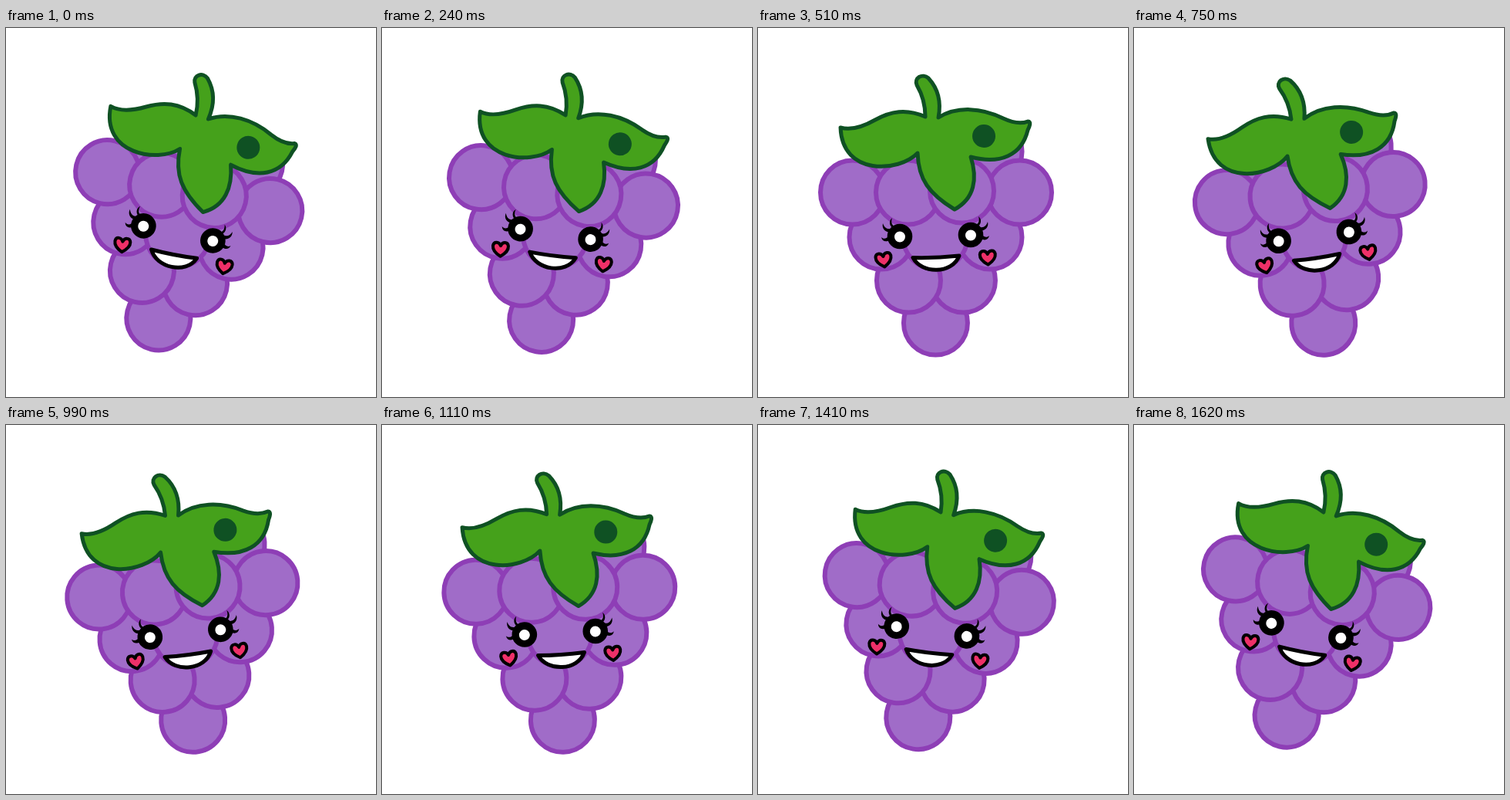
Write an HTML page that moves like this. It is 480 px wide and 478 px high and loops after 1650 ms.

```html
<!DOCTYPE html>
<html lang="en">
<head>
<meta charset="utf-8">
<title>Swinging grapes</title>
<style>
  html, body { margin: 0; width: 100%; height: 100%; overflow: hidden; background: #fff; }
  svg { display: block; width: 100%; height: 100%; }
  #grapes { fill: #a06cc8; stroke: #8e3eb6; stroke-width: 6; }
  #leaf { fill: #45a11b; stroke: #0f5123; stroke-width: 5; stroke-linejoin: round; }
  #mouth { fill: #fff; stroke: #000; stroke-width: 5; stroke-linejoin: round; }
  #heart { fill: #ee3068; stroke: #000; stroke-width: 4; stroke-linejoin: round; }
</style>
</head>
<body>
<svg viewBox="0 0 480 478">
  <defs>
    <path id="heart" d="M0 9.5C-6 6-10.5 2-10-4C-9-10-2-9.5 0-4C2-9.5 9-10 10-4C10.5 2 6 6 0 9.5Z"/>
  </defs>
  <g id="bunch">
    <g id="grapes"></g>
    <g id="leaf">
      <path d="M217 115C217 98 213 86 206 74C202 65 213 58 221 65C234 79 238 95 234 116C258 101 290 103 318 117C333 124 342 124 350 121C355 121 352 128 350 132C342 165 314 177 276 167C285 195 281 221 255 235C222 215 208 196 207 162C183 187 109 192 107 129C120 133 136 128 152 119C172 108 192 104 217 115Z"/>
      <circle cx="293" cy="140" r="15" fill="#0f5123" stroke="none"/>
    </g>
    <g id="eye">
      <circle cx="184" cy="270" r="16.3"/>
      <circle cx="184" cy="270.5" r="7" fill="#fff"/>
      <path d="M174 246C169 250 170 258 178 261L180 258C174 257 172 252 174 246ZM162 253C160 261 167 266 173 264L175 259C168 262 164 259 162 253ZM160 271C161 277 167 278 172 274L170 269C167 273 163 274 160 271Z"/>
    </g>
    <use href="#eye" transform="matrix(-1 0 0 1 460 -2)"/>
    <path id="mouth" d="M201 297.5C220 298 242 297 261 295C252 319 212 319 201 297.5Z"/>
    <use href="#heart" transform="translate(163 300) rotate(-8)"/>
    <use href="#heart" transform="translate(298 297) rotate(-3)"/>
  </g>
</svg>
<script>
const LOOP = 1650, STEP = 30;
const bunch = document.getElementById('bunch');

// Grape centres, back to front
const centres = [
  [178, 160], [301, 160],
  [230.5, 382], [266.5, 327], [195.5, 327],
  [160, 271], [301, 271], [230, 271],
  [122.5, 213], [339.5, 213], [194.5, 213], [264.5, 211]
];
document.getElementById('grapes').innerHTML =
  centres.map(([x, y]) => `<circle cx="${x}" cy="${y}" r="41.5"/>`).join('');

function draw(now) {
  const time = Math.floor(now % LOOP / STEP) * STEP;
  const angle = 3.35 + 9.95 * Math.cos((time - 8) / LOOP * 2 * Math.PI);
  bunch.setAttribute('transform', `rotate(${angle} 240 239)`);
  requestAnimationFrame(draw);
}
draw(0);
</script>
</body>
</html>
```
